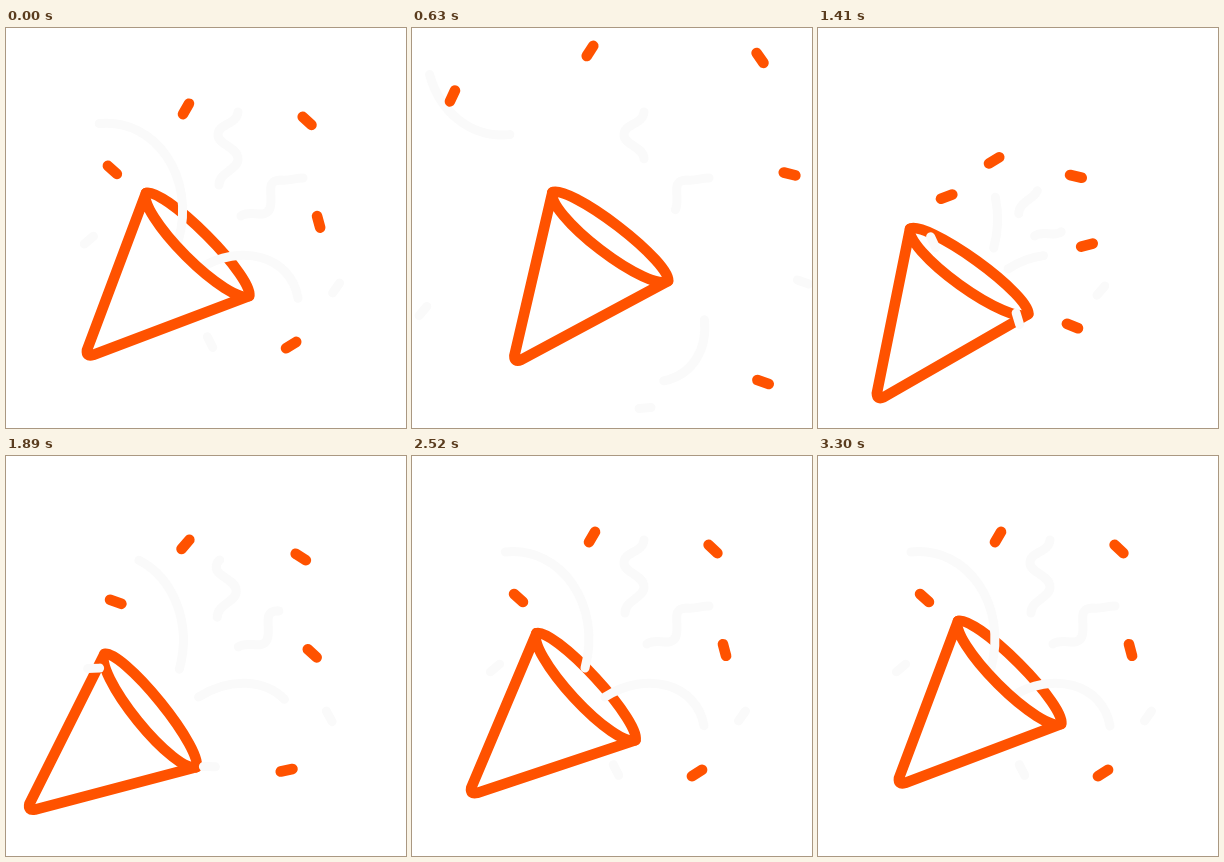
An HTML page for the animation above (4330 ms loop, 400 px wide and 400 px high).

```html
<!DOCTYPE html>
<html lang="en">
<head>
<meta charset="utf-8">
<title>Party popper</title>
<style>
  html, body { margin: 0; width: 100%; height: 100%; overflow: hidden; background: #fff; }
  svg { display: block; width: 100%; height: 100%; }
  path { fill: none; stroke: #ff5200; stroke-width: 10.6; stroke-linecap: round; stroke-linejoin: round; }
  .pale { stroke: #fafafa; stroke-width: 9; }
  #streamers path { transform-box: fill-box; transform-origin: center; }
</style>
</head>
<body>
<svg viewBox="0 0 400 400">
  <path class="cone" d="M140 165A73 14 45 0 1 243 268"/>
  <g id="streamers"></g>
  <path class="cone" d="M140 165L81 322Q80 329 87 327L243 268A73 17.5 45 0 1 140 165Z"/>
  <g id="bits"></g>
</svg>
<script>
const LOOP = 4330, BURST = 1110, OUT = 1080;

// time, recoil, tilt
const cone = [
  [0, 0, 0], [630, 11.4, -7.5], [1080, 12, -10.5], [1410, -34.5, -9.2], [1620, -51, -2],
  [1890, -51, 6], [2250, -32.5, 3.7], [2820, -6.7, 1], [3300, 0, 0]
];

// rest x, y, angle; flight dx, dy, turn; spin left in the burst
const orange = [
  [106.5, 142, 42, -66, -74, -107, -62],
  [180, 81, -60, -2, -58, 3, 29],
  [301, 93, 43, 47, -63, 12, -30],
  [312.5, 194, 75, 65, -48, -61, -90],
  [285, 317, -32, 66, 37, 51, 54]
];
const pale = [
  [83, 212, -40, -72, 71, -10, 105],
  [330, 260, -55, 61, -6, 75, -175],
  [204, 314, 63, 29, 66, -68, -170]
];

// path from the mouth outwards; flight dx, dy, turn
const streamers = [
  ['M173 212C190 150 150 90 93 96', -79, -105, 180],
  ['M193 241C235 214 285 228 292 270', 29, 54, 88],
  ['M213 157C213 144 232 142 232 131C232 119 212 117 212 107C212 95 231 97 232 84', 0, 0, 0],
  ['M235 188C244 181 260 192 264 180C268 168 258 152 275 152C284 153 288 150 297 150', 0, 0, 0]
];

const clamp = v => Math.max(0, Math.min(1, v));

// smooth curve through keys, flat at both ends
function track(keys, t, col) {
  const last = keys.length - 1;
  if (t >= keys[last][0]) return keys[last][col];
  let i = 0;
  while (t >= keys[i + 1][0]) i++;
  const slope = k => k < 1 || k >= last ? 0 :
    (keys[k + 1][col] - keys[k - 1][col]) / (keys[k + 1][0] - keys[k - 1][0]);
  const [a, b] = [keys[i], keys[i + 1]], d = b[0] - a[0], u = (t - a[0]) / d, v = 1 - u;
  return a[col] * v * v * (1 + 2 * u) + b[col] * u * u * (3 - 2 * u)
    + d * u * v * (v * slope(i) - u * slope(i + 1));
}

const flight = t => 1.26 * Math.sin(Math.PI / 2 * t / OUT);

// offset of a resting point towards its starting place along the mouth
function pull(x, y, t) {
  const s = t - BURST, r = Math.exp(-.0037 * s) * (1 - clamp(s / 1250) ** 4);
  return [(160 + .1 * y - x) * r, (202 + .2 * x - y) * r];
}

function add(parent, d, cls = '') {
  const el = document.createElementNS('http://www.w3.org/2000/svg', 'path');
  el.setAttribute('d', d);
  el.setAttribute('class', cls);
  return document.getElementById(parent).appendChild(el);
}

const coneEls = document.querySelectorAll('.cone');
const bits = [...orange, ...pale];
const bitEls = bits.map((b, i) => add('bits', 'M-6 0H6', i < orange.length ? '' : 'pale'));
const streamerEls = streamers.map(([d]) => add('streamers', d, 'pale'));

function drawBit(el, [x, y, a, dx, dy, turn, spin], t) {
  let size;
  if (t < BURST) {
    const f = flight(t);
    x += dx * f; y += dy * f; a += turn * f;
    size = clamp((OUT + 10 - t) / 50);
  } else {
    const [px, py] = pull(x, y, t);
    x += px; y += py;
    a += spin * (Math.max(0, 2300 - t) / 890) ** 1.3;
    size = clamp((t - BURST) / 90);
  }
  el.setAttribute('transform', `translate(${x} ${y}) rotate(${a}) scale(${size})`);
}

function drawStreamer(el, [, dx, dy, turn], t) {
  const total = el.getTotalLength(), mouth = el.getPointAtLength(0);
  let x, y, a = 0, from = 0, len;
  if (t < BURST) {
    const f = flight(t);
    x = dx * f; y = dy * f; a = turn * f;
    len = 1 - clamp(t / OUT) ** 2;
    from = 1 - len;
  } else {
    [x, y] = pull(mouth.x, mouth.y, t);
    len = 1 - (1 - clamp((t - 1170) / 1430)) ** 2;
  }
  el.style.display = len > .01 ? '' : 'none';
  el.style.strokeDasharray = `${len * total} ${2 * total}`;
  el.style.strokeDashoffset = -from * total;
  el.style.transform = `translate(${x}px, ${y}px) rotate(${a}deg)`;
}

function draw(t) {
  const x = track(cone, t, 1), a = track(cone, t, 2);
  coneEls.forEach(el => el.setAttribute('transform', `translate(${x} ${-.75 * x}) rotate(${a} 195 253)`));
  bitEls.forEach((el, i) => drawBit(el, bits[i], t));
  streamerEls.forEach((el, i) => drawStreamer(el, streamers[i], t));
}

const start = performance.now();
function tick() {
  draw((performance.now() - start) % LOOP);
  requestAnimationFrame(tick);
}
tick();
</script>
</body>
</html>
```
